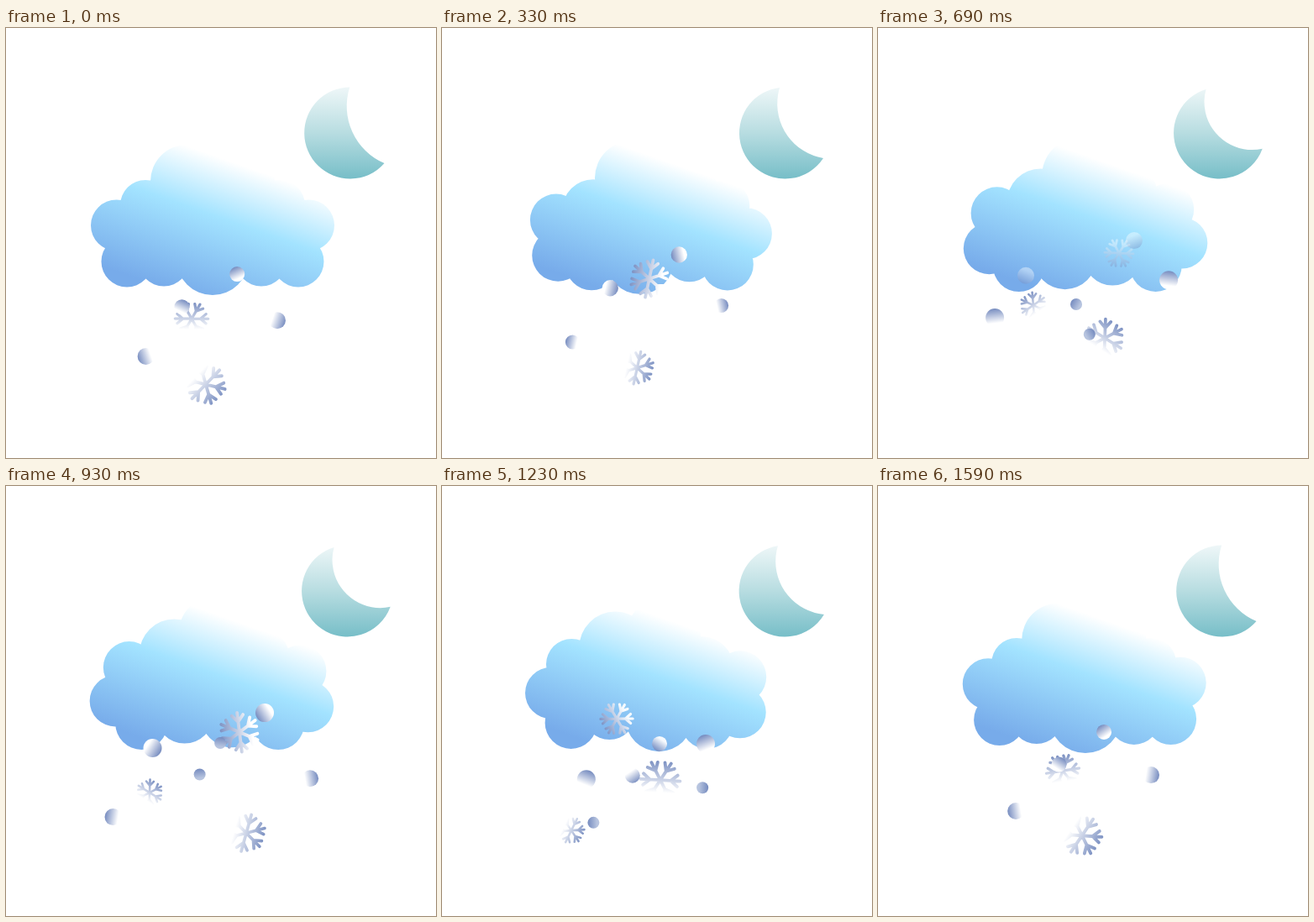
Animation of 512x512 px, one loop 1620 ms. Source, as an HTML page with a canvas:

```html
<!DOCTYPE html>
<html lang="en">
<head>
<meta charset="utf-8">
<title>Snowy night</title>
<style>
  html, body { margin: 0; width: 100%; height: 100%; overflow: hidden; background: #fff; }
  canvas { display: block; width: 512px; height: 512px; }
</style>
</head>
<body>
<canvas id="stage" width="512" height="512"></canvas>
<script>
const ctx = document.getElementById('stage').getContext('2d');
const LOOP = 1620;
const TAU = Math.PI * 2;
const RAD = Math.PI / 180;
const mix = (a, b, k) => a + (b - a) * k;
const clamp = v => Math.max(0, Math.min(1, v));

function gradient(x0, y0, x1, y1, ...stops) {
  const g = ctx.createLinearGradient(x0, y0, x1, y1);
  for (const [at, color] of stops) g.addColorStop(at, color);
  return g;
}

// Puffs [x, y, radius] from the bottom up the left side to the top, in quarter steps.
// The right side mirrors it; eleven puffs travel around, one place per loop.
const PUFFS = 11, STEPS = 4 * PUFFS, AXIS = 246;
const puffPath = [
  [246, 275, 43], [233, 276, 40], [218, 273, 36], [200, 271, 31],
  [188, 277, 30.5], [176, 282, 31], [164.5, 283, 31], [154, 282, 31],
  [144, 278, 30.5], [137, 269, 31], [131, 259.5, 30.5], [129.5, 247, 30.5],
  [131.5, 235, 30.5], [137, 227, 31], [144, 218, 31], [154, 212.5, 30.5],
  [166, 211, 30], [183, 217, 38], [197.5, 203.5, 41], [206, 193, 43],
  [215.5, 182.5, 43.5], [229, 178, 44.5], [246, 176, 46]
];

function puffKey(i) {
  const k = (i + STEPS) % STEPS;
  if (k < puffPath.length) return puffPath[k];
  const [x, y, r] = puffPath[STEPS - k];
  return [2 * AXIS - x, y, r];
}

function puffAt(place) {
  const s = place * 4, i = Math.floor(s), u = s - i;
  const [a, b, c, d] = [i - 1, i, i + 1, i + 2].map(puffKey);
  return b.map((p, n) => p + 0.5 * u * (c[n] - a[n] +
    u * (2 * a[n] - 5 * p + 4 * c[n] - d[n] + u * (3 * (p - c[n]) + d[n] - a[n]))));
}

function drawCloud(phase) {
  const puffs = Array.from({ length: PUFFS }, (_, i) => puffAt(i + phase));
  ctx.beginPath();
  for (const [x, y] of puffs) ctx.lineTo(x, y);
  ctx.closePath();
  for (const [x, y, r] of puffs) {
    ctx.moveTo(x + r, y);
    ctx.arc(x, y, r, 0, TAU);
  }
  ctx.fillStyle = gradient(285, 165, 229, 324,
    [0, '#fff'], [0.4, '#a3e3ff'], [1, '#77abea']);
  ctx.fill();
}

function drawMoon(phase) {
  const m = 0.5 - 0.5 * Math.cos(TAU * phase);
  const cx = mix(409.7, 406.4, m), cy = 125, R = 54.5;
  const start = mix(-90.5, -108, m) * RAD, end = mix(41.5, 19, m) * RAD;
  const axis = (start + end) / 2, half = (end - start) / 2;
  const chord = R * Math.sin(half), depth = mix(19.2, 28, m);
  const r = (chord * chord + depth * depth) / (2 * depth);
  const off = R * Math.cos(half) + r - depth;
  const spread = Math.asin(chord / r);
  ctx.beginPath();
  ctx.arc(cx, cy, R, start, end, true);
  ctx.arc(cx + off * Math.cos(axis), cy + off * Math.sin(axis), r,
    axis + Math.PI - spread, axis + Math.PI + spread);
  ctx.closePath();
  ctx.fillStyle = gradient(0, 68, 0, 181, [0, '#f1f8f9'], [0.5, '#b8dde1'], [1, '#75bdc7']);
  ctx.fill();
}

// Each fall is one snowflake with a mirrored pair of balls.
// Keys: time, flake x and y, right ball x, y and radius.
const falls = [
  { born: 640, dies: 1660, size: 25, turn: 0.335, level: 1221, keys: [
    [690, 287, 268, 305, 253, 10], [930, 278, 293, 308, 270, 11],
    [1230, 260, 350, 314, 307, 11], [1590, 243, 416, 325, 344, 10],
    [1620, 238, 424, 323, 348, 10]] },
  { born: 1110, dies: 2150, size: 21, turn: 0.31, level: 1620, keys: [
    [1230, 208, 277, 259, 307, 9], [1590, 220, 339, 269, 293, 9],
    [1620, 221, 346, 275, 293, 9], [1800, 229, 383, 314, 304, 9],
    [2100, 235, 424, 348, 360, 8]] },
  { born: 80, dies: 1010, size: 24, turn: 0.306, level: 586, keys: [
    [180, 239, 277, 265, 275, 8], [480, 255, 322, 302, 270, 11],
    [690, 270, 369, 346, 300, 11], [930, 286, 413, 362, 348, 10]] },
  { born: 420, dies: 1310, size: 16.5, turn: 0.28, level: 816, dark: true, keys: [
    [480, 197, 302, 236, 335, 0], [690, 185, 330, 236, 329, 7],
    [930, 171, 365, 255, 306, 7], [1230, 154, 410, 310, 359, 7]] }
];

function sample(keys, t) {
  const last = keys.length - 1;
  let i = 0;
  while (i < last - 1 && t > keys[i + 1][0]) i++;
  const a = keys[i], b = keys[i + 1], span = b[0] - a[0];
  const u = (t - a[0]) / span;
  const before = keys[Math.max(0, i - 1)], after = keys[Math.min(last, i + 2)];
  return a.slice(1).map((p, k) => {
    const n = k + 1, q = b[n];
    if (u < 0 || u > 1) return mix(p, q, u);
    const m0 = (q - before[n]) / (b[0] - before[0]) * span;
    const m1 = (after[n] - p) / (after[0] - a[0]) * span;
    const u2 = u * u, u3 = u2 * u;
    return (2 * u3 - 3 * u2 + 1) * p + (u3 - 2 * u2 + u) * m0 +
      (3 * u2 - 2 * u3) * q + (u3 - u2) * m1;
  });
}

function snowPaint(x, y, r, angle, pale) {
  const dx = r * Math.cos(angle), dy = r * Math.sin(angle);
  return gradient(x + dx, y + dy, x - dx, y - dy, [0, '#758bbf'], [0.8, pale], [1, pale]);
}

function drawBall(x, y, r, angle, pale) {
  ctx.beginPath();
  ctx.arc(x, y, r, 0, TAU);
  ctx.fillStyle = snowPaint(x, y, r, angle, pale);
  ctx.fill();
}

function drawFlake(x, y, r, turn) {
  const line = (d0, a0, d1, a1) => {
    ctx.moveTo(x + d0 * Math.cos(a0), y + d0 * Math.sin(a0));
    ctx.lineTo(x + d1 * Math.cos(a1), y + d1 * Math.sin(a1));
  };
  ctx.beginPath();
  for (let i = 0; i < 6; i++) {
    const a = turn + i * TAU / 6;
    line(0, a, r * 0.94, a);
    line(r * 0.5, a, r * 0.86, a - 0.32);
    line(r * 0.5, a, r * 0.86, a + 0.32);
  }
  ctx.lineWidth = r * 0.155;
  ctx.lineCap = 'round';
  ctx.strokeStyle = snowPaint(x, y, r, turn - Math.PI / 2, '#fff');
  ctx.stroke();
}

function drawFall(fall, time) {
  const t = time < fall.born ? time + LOOP : time;
  if (t > fall.dies) return;
  const grown = clamp((t - fall.born) / 130);
  const [fx, fy, bx, by, br] = sample(fall.keys, t);
  const turn = (t - fall.level) * fall.turn * RAD;
  const angle = turn - 115 * RAD;
  const pale = fall.dark ? '#b7c4df' : '#fff';
  const sum = 481 + (by - 253) * 0.09;
  const drop = 36.5 + 0.08 * (bx - sum / 2);
  const radius = Math.max(0, br);
  ctx.globalAlpha = grown * clamp((fall.dies - t) / 40);
  drawFlake(fx, fy, fall.size * mix(0.55, 1, grown), turn);
  if (radius > 0) {
    drawBall(bx, by, radius, angle, pale);
    drawBall(sum - bx, by + drop, radius, Math.PI - angle, pale);
  }
  ctx.globalAlpha = 1;
}

function draw() {
  const time = performance.now() % LOOP;
  ctx.fillStyle = '#fff';
  ctx.fillRect(0, 0, 512, 512);
  drawMoon(time / LOOP);
  drawCloud(time / LOOP);
  for (const fall of falls) drawFall(fall, time);
  requestAnimationFrame(draw);
}
draw();
</script>
</body>
</html>
```
